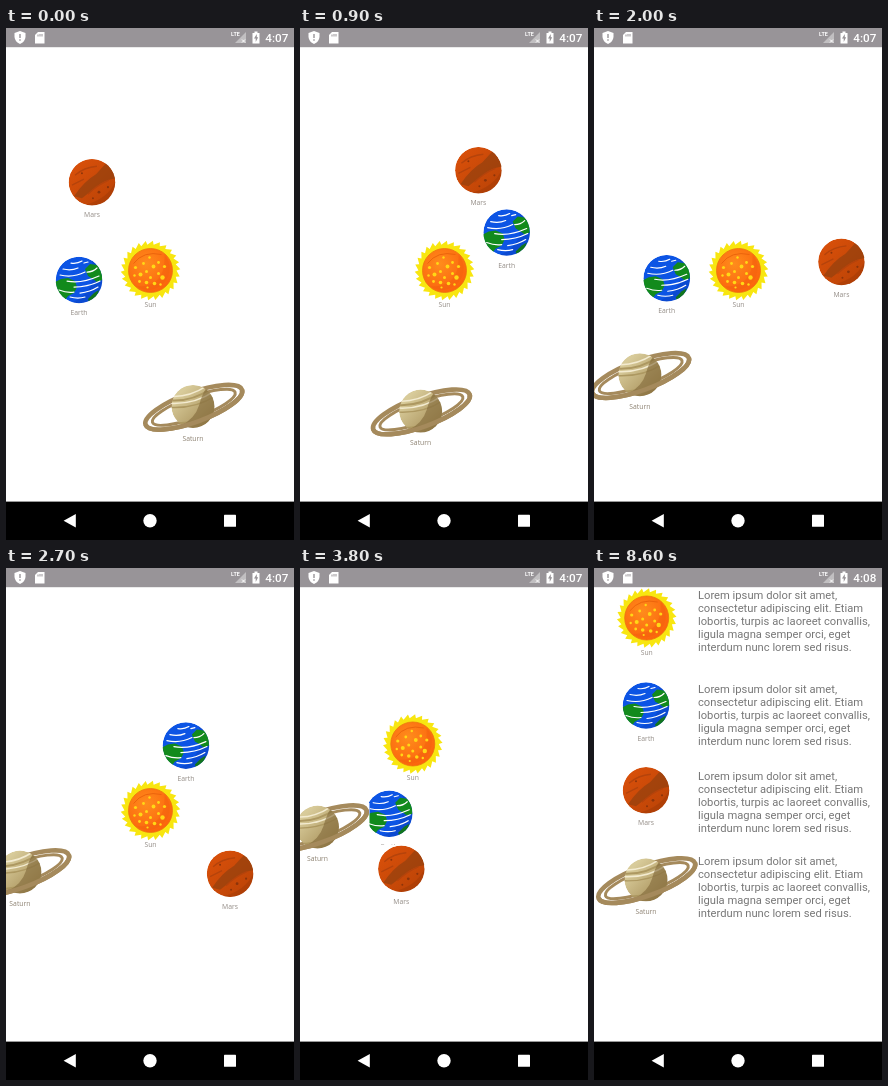
Write an HTML page that moves like this. It is 288 px wide and 512 px high and loops after 8700 ms.

```html
<!DOCTYPE html>
<html lang="en">
<head>
<meta charset="utf-8">
<title>Orbit to list</title>
<style>
  html, body { margin: 0; width: 100%; height: 100%; overflow: hidden; background: #fff; }
  svg { display: block; width: 288px; height: 512px; }
  .label { font: 6.8px "Open Sans", "Noto Sans", sans-serif; fill: #938c86; text-anchor: middle; }
  .copy { font: 11.2px Roboto, sans-serif; fill: #777; }
  .clock { font: 500 11.7px Roboto, sans-serif; fill: #fff; }
  .lte { font: 700 5.4px Roboto, sans-serif; fill: #fff; }
</style>
</head>
<body>
<svg viewBox="0 0 288 512">
  <defs>
    <clipPath id="disc"><circle r="23.3"/></clipPath>
    <clipPath id="globe"><circle r="21.5"/></clipPath>
    <radialGradient id="sunFill" cx=".4" cy=".35" r=".7">
      <stop offset="0" stop-color="#ff8c1c"/><stop offset="1" stop-color="#fb620c"/>
    </radialGradient>
    <linearGradient id="marsFill" x2="1" y2="1">
      <stop offset=".1" stop-color="#d9500a"/><stop offset="1" stop-color="#b84206"/>
    </linearGradient>
    <linearGradient id="saturnFill" x2="1" y2="1">
      <stop offset=".2" stop-color="#d8cb9a"/><stop offset=".9" stop-color="#a58d56"/>
    </linearGradient>
  </defs>

  <g id="copy" class="copy"></g>

  <g id="sun">
    <rect x="-30" y="-30" width="60" height="68" fill="#fff"/>
    <path id="rays" fill="#f8e610"/>
    <circle r="22" fill="url(#sunFill)" stroke="#ec7410" stroke-width=".8"/>
    <path d="M14 -16A21.5 21.5 0 0 1 -14 16Q16 16 14 -16" fill="#f4600e" opacity=".5"/>
    <path d="M-17 -7Q-7 -20 11 -16" fill="none" stroke="#ec640c"/>
    <g id="spots" fill="#ffd816"></g>
    <text class="label" y="36.5">Sun</text>
  </g>

  <g id="earth">
    <rect x="-24.5" y="-24" width="49" height="62" fill="#fff"/>
    <g clip-path="url(#disc)">
      <circle r="23.3" fill="#0c54e4"/>
      <path d="M12 -24A24 24 0 0 1 -12 24Q22 14 12 -24" fill="#0a40c0" opacity=".5"/>
      <path d="M-24 2L-18 -1L-11 -2L-4 1L-2 7L-5 13L-11 16L-14 20L-20 17L-24 10Z" fill="#128a1c"/>
      <path d="M6 -11L11 -16L18 -15L23 -9L23 0L18 2L14 -1L9 -4Z" fill="#128a1c"/>
      <path d="M9 19L15 13L20 10L17 18L10 22Z" fill="#12751c"/>
      <g fill="none" stroke="#fff" stroke-width="1.2" stroke-linecap="round">
        <path d="M-8 -17Q-2 -16 3 -19M-16 -11Q-8 -9 -1 -12M5 -17L9 -18M8 -8Q14 -8 18 -12"/>
        <path d="M-19 -5Q-6 -2 6 -8M-12 1Q2 4 20 -4"/>
        <path d="M-5 7Q9 7 21 1M-20 10Q-12 13 -5 12M1 13Q11 12 19 7M-9 17Q-1 19 6 17"/>
      </g>
    </g>
    <text class="label" y="35.2">Earth</text>
  </g>

  <g id="mars">
    <rect x="-24.5" y="-24" width="49" height="62" fill="#fff"/>
    <g clip-path="url(#disc)">
      <circle r="23.3" fill="url(#marsFill)"/>
      <path d="M-18 14Q-8 -1 4 -8L15 -20L25 -4Q12 -2 4 5L-10 16Z" fill="#93400f" opacity=".7"/>
      <path d="M25 -5A24 24 0 0 1 -9 23Q18 17 25 -5" fill="#a23a06" opacity=".5"/>
      <path d="M-17 -7Q-8 -15 5 -16M-20 3L-8 -3M-4 12Q5 3 17 -2" fill="none" stroke="#b5430b" stroke-width="1.4"/>
      <g fill="#8c340a">
        <circle cx="-10" cy="-9" r="1"/><circle cx="7" cy="10" r="1.4"/>
        <circle cx="16" cy="5" r="1.1"/><circle cx="1" cy="16" r="1"/>
      </g>
    </g>
    <text class="label" y="34.8">Mars</text>
  </g>

  <g id="saturn">
    <rect x="-51" y="-24" width="103" height="62" fill="#fff"/>
    <g transform="translate(.8 .8) rotate(-20)" fill="none" stroke="#a58a5c">
      <ellipse rx="51.3" ry="14.8" stroke-width="4.6"/>
      <ellipse rx="44" ry="10.6" stroke-width="3"/>
    </g>
    <g clip-path="url(#globe)">
      <circle r="21.5" fill="url(#saturnFill)"/>
      <g fill="none" stroke="#ad9861">
        <path d="M-22 -6Q0 -5 18 -18" stroke-width="2"/>
        <path d="M-22 1Q4 2 23 -11" stroke-width="1.4"/>
        <path d="M-18 17Q8 17 23 4" stroke-width="2.5"/>
      </g>
      <g fill="none" stroke="#f3ebd0" stroke-width="1.5">
        <path d="M-22 -10Q-4 -9 13 -20"/>
        <path d="M-22 -3Q2 -2 21 -15"/>
      </g>
      <path d="M13 -18A22 22 0 0 1 -12 19Q2 12 6 -1Q9 -12 13 -18" fill="#80683a" opacity=".6"/>
    </g>
    <path d="M-51.3 0A51.3 14.8 0 0 0 51.3 0" transform="translate(.8 .8) rotate(-20)" fill="none" stroke="#a58a5c" stroke-width="4.6"/>
    <text class="label" y="34.3" style="fill:#8d8272">Saturn</text>
  </g>

  <!-- status bar -->
  <rect width="288" height="19.2" fill="#989498"/>
  <g fill="#fff">
    <path d="M14 3L19.5 5V9Q19 14 14 16Q9 14 8.5 9V5Z"/>
    <path d="M32 4H38.5V15.5H29V7Z"/>
    <path d="M247 5H248.5V3.5H251.5V5H253.5V15.5H246.5V5Z"/>
    <path d="M240 4V15H229Z" opacity=".4"/>
  </g>
  <g fill="#989498">
    <path d="M13.3 6H14.7V10H13.3ZM13.3 11.3H14.7V12.7H13.3Z"/>
    <path d="M31.5 6.5H32.5V8.5H31.5ZM33.5 6H34.5V8.5H33.5ZM35.5 6H36.5V8.5H35.5Z"/>
    <path d="M250.8 6L248 10.5H249.7V14L252.2 9.3H250.8Z"/>
  </g>
  <path d="M236 11.5L239 14.5M239 11.5L236 14.5" stroke="#fff"/>
  <text class="lte" x="225" y="8.2">LTE</text>
  <text id="clock" class="clock" x="259.3" y="13.8">4:07</text>

  <!-- navigation bar -->
  <rect y="473.6" width="288" height="38.4" fill="#000"/>
  <g fill="#fff">
    <path d="M57.6 492.8L69.8 486V499.6Z"/>
    <circle cx="144" cy="492.8" r="6.7"/>
    <rect x="218" y="486.8" width="12" height="12" rx=".6"/>
  </g>
</svg>
<script>
const $ = id => document.getElementById(id);
const LOOP = 8700, STEP = 100, FIRST_MOVE = 300;
const MOVE_START = 3680, PHASE = 300;
const CENTER = { x: 144, y: 240 };
const LIST_X = 52;

// angle in degrees at time zero, speed in degrees per second, place in the list
const planets = [
  { id: 'earth', radius: 72, angle: 165.8, speed: 183, listY: 137.5 },
  { id: 'mars', radius: 103.6, angle: 234.4, speed: 61.1, listY: 222.3 },
  { id: 'saturn', radius: 145, angle: 72, speed: 30.3, listY: 311.8 }
];
const lines = [
  'Lorem ipsum dolor sit amet,',
  'consectetur adipiscing elit. Etiam',
  'lobortis, turpis ac laoreet convallis,',
  'ligula magna semper orci, eget',
  'interdum nunc lorem sed risus.'
];

const polar = (r, a) => [r * Math.cos(a), r * Math.sin(a)];
const clamp = v => Math.min(1, Math.max(0, v));
const ease = p => (1 - Math.cos(Math.PI * p)) / 2;
const mix = (a, b, k) => a + (b - a) * k;

function drawRays(count) {
  const points = [];
  for (let i = 0; i < count; i++) {
    const a = i / count * 2 * Math.PI;
    points.push(polar(26, a), polar(29.8, a + .2));
  }
  $('rays').setAttribute('d', 'M' + points.join('L') + 'Z');
}

function drawSpots() {
  const spots = [
    [-15, -3, 1.6], [-10, 4, 2], [-4, 1, 1.5], [3, -4, 1.9], [8, 3, 1.5],
    [12, 7, 2.2], [4, 13, 1.8], [-4, 12, 1.8], [-11, 11, 1.4], [8, -8, 1.4],
    [14, -4, 1.6], [-7, -7, 1.4], [0, 7, 1.5], [-1, -13, 1.2], [10, 14, 1.2],
    [-16, 5, 1.2], [-3, 17, 1.1]
  ];
  $('spots').innerHTML = spots
    .map(([x, y, r]) => `<circle cx="${x}" cy="${y}" r="${r}"/>`).join('');
}

function drawCopy() {
  $('copy').innerHTML = [31, 125, 211.5, 297].map(top => lines
    .map((s, i) => `<text x="104" y="${top + i * 13.05}">${s}</text>`).join('')).join('');
}

function place(id, x, y) {
  $(id).setAttribute('transform', `translate(${x.toFixed(2)} ${y.toFixed(2)})`);
}

function render() {
  // the picture advances in tenths of a second
  const t = Math.floor(performance.now() % LOOP / STEP) * STEP;
  const orbit = t < FIRST_MOVE ? 25 : Math.min(t, MOVE_START);
  const k = ease(clamp((t - MOVE_START) / PHASE));

  place('sun', mix(144.5, 52.7, k), mix(242.5, 50, k));
  for (const p of planets) {
    const a = (p.angle + p.speed * orbit / 1000) * Math.PI / 180;
    const [x, y] = polar(p.radius, a);
    place(p.id, mix(CENTER.x + x, LIST_X, k), mix(CENTER.y + y, p.listY, k));
  }
  $('copy').setAttribute('opacity', clamp((t - MOVE_START - PHASE) / PHASE));
  $('clock').textContent = t < 8600 ? '4:07' : '4:08';
  requestAnimationFrame(render);
}

drawRays(26);
drawSpots();
drawCopy();
render();
</script>
</body>
</html>
```
